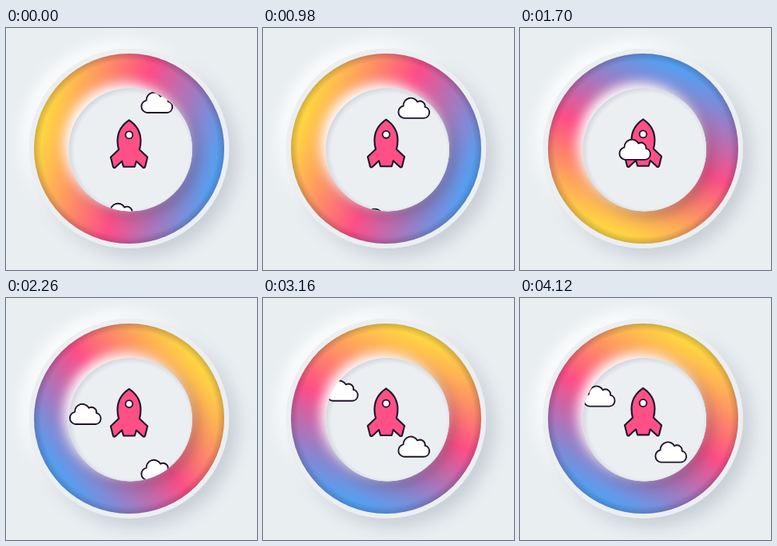
These frames come from a looping animation (314 by 303 pixels, 4200 ms). An HTML page with a canvas:

```html
<!DOCTYPE html>
<html lang="en">
<head>
<meta charset="utf-8">
<title>Rocket loader</title>
<style>
  html, body { margin: 0; width: 100%; height: 100%; overflow: hidden; background: #e9eef1; }
  canvas { display: block; width: 314px; height: 303px; }
</style>
</head>
<body>
<canvas id="stage"></canvas>
<script>
const W = 314, H = 303;
const LOOP = 4200, STEP = 80, TURN = 961;
// Evenly stepped stretches: first and last step of each
const STRETCHES = [[0, 800], [900, 3140], [3240, 4120]];

const BG = '#e9eef1', FACE = '#ebeff2', INK = '#21142a', PINK = '#fe5087';
const RING = { x: 154, y: 151, r: 119 };
const HOLE = { x: 155.7, y: 152.2, r: 77.3 };
const FALL = 347;
const CLOUDS = [{ x: 78.5, y: 8 }, { x: 123, y: 217 }, { x: 168, y: 78 }];

const cloudPath = new Path2D(
  'M8.5 28A7.8 7.8 0 0 1 7.6 12.6A9.4 9.4 0 0 1 25.2 7.6A6.3 6.3 0 0 1 34.6 14A7.1 7.1 0 0 1 33.4 28Z');
const rocketPath = new Path2D(
  'M0 -37C-9 -31 -14.5 -22 -14.5 -11C-14.5 -7 -14 -3.5 -13 0L-23 9.5L-20 21.5Q-19 23.5 -17 22L-9 14.5' +
  'L-7 21.5H7L9 14.5L17 22Q19 23.5 20 21.5L23 9.5L13 0C14 -3.5 14.5 -7 14.5 -11C14.5 -22 9 -31 0 -37Z');

const canvas = document.getElementById('stage');
const ctx = canvas.getContext('2d');
const dpr = window.devicePixelRatio || 1;
canvas.width = W * dpr;
canvas.height = H * dpr;

function circle(x, y, r) {
  ctx.beginPath();
  ctx.arc(x, y, r, 0, Math.PI * 2);
}

function raised(x, y, r, fill, shadow, offset, blur) {
  ctx.save();
  ctx.shadowColor = shadow;
  ctx.shadowOffsetX = ctx.shadowOffsetY = offset * dpr;
  ctx.shadowBlur = blur * dpr;
  ctx.fillStyle = fill;
  circle(x, y, r);
  ctx.fill();
  ctx.restore();
}

function edgeShade(c, shift, inner, outer, color, alpha) {
  const g = ctx.createRadialGradient(c.x + shift, c.y + shift, inner, c.x + shift, c.y + shift, outer);
  g.addColorStop(0, `rgba(${color},0)`);
  g.addColorStop(1, `rgba(${color},${alpha})`);
  ctx.fillStyle = g;
  circle(c.x, c.y, c.r);
  ctx.fill();
}

function outline(path, fill, width) {
  ctx.fillStyle = fill;
  ctx.strokeStyle = INK;
  ctx.lineWidth = width;
  ctx.lineJoin = 'round';
  ctx.fill(path);
  ctx.stroke(path);
}

function drawRing(time) {
  const { x, y, r } = RING;
  raised(x, y, 125, FACE, '#ffffff', -9, 20);
  raised(x, y, 125, FACE, 'rgba(120,135,150,.32)', 10, 22);
  circle(x, y, 125);
  ctx.fillStyle = FACE;
  ctx.fill();

  const a = Math.PI + (15 / 360 + time / TURN) * Math.PI * 2;
  const dx = Math.cos(a) * r, dy = Math.sin(a) * r;
  const g = ctx.createLinearGradient(x + dx, y + dy, x - dx, y - dy);
  g.addColorStop(0, '#ffe03c');
  g.addColorStop(0.5, '#fd4d87');
  g.addColorStop(1, '#48a5f8');
  ctx.fillStyle = g;
  circle(x, y, r);
  ctx.fill();
  edgeShade(RING, 0, 110, 119, '70,30,60', 0.25);

  ctx.save();
  circle(x, y, r);
  ctx.clip();
  raised(HOLE.x, HOLE.y, HOLE.r, FACE, 'rgba(40,40,60,.3)', 7, 18);
  raised(HOLE.x, HOLE.y, HOLE.r, FACE, '#ffffff', -6, 15);
  ctx.restore();
  edgeShade(HOLE, 2, 72, 80, '150,160,180', 0.3);
}

function drawRocket(time) {
  ctx.save();
  ctx.translate(154, 152.3 - 2.5 * time / LOOP);
  outline(rocketPath, PINK, 2.1);
  const pane = new Path2D();
  pane.arc(0, -18.4, 4.5, 0, Math.PI * 2);
  outline(pane, '#f7fafa', 1.8);
  ctx.restore();
}

function drawClouds(time) {
  ctx.save();
  circle(HOLE.x, HOLE.y, HOLE.r);
  ctx.clip();
  for (const { x, y } of CLOUDS) {
    let top = (y + time / TURN * FALL) % FALL;
    if (top > 290) top -= FALL;
    ctx.save();
    ctx.translate(x, top);
    outline(cloudPath, '#ffffff', 1.9);
    ctx.restore();
  }
  ctx.restore();
}

function stepTime(t) {
  const [first, last] = STRETCHES.filter(s => s[0] <= t).pop();
  return Math.min(last, first + Math.floor((t - first) / STEP) * STEP);
}

function draw(time) {
  ctx.setTransform(dpr, 0, 0, dpr, 0, 0);
  ctx.fillStyle = BG;
  ctx.fillRect(0, 0, W, H);
  drawRing(time);
  drawRocket(time);
  drawClouds(time);
}

const start = performance.now();
function tick() {
  draw(stepTime((performance.now() - start) % LOOP));
  requestAnimationFrame(tick);
}
tick();
</script>
</body>
</html>
```
